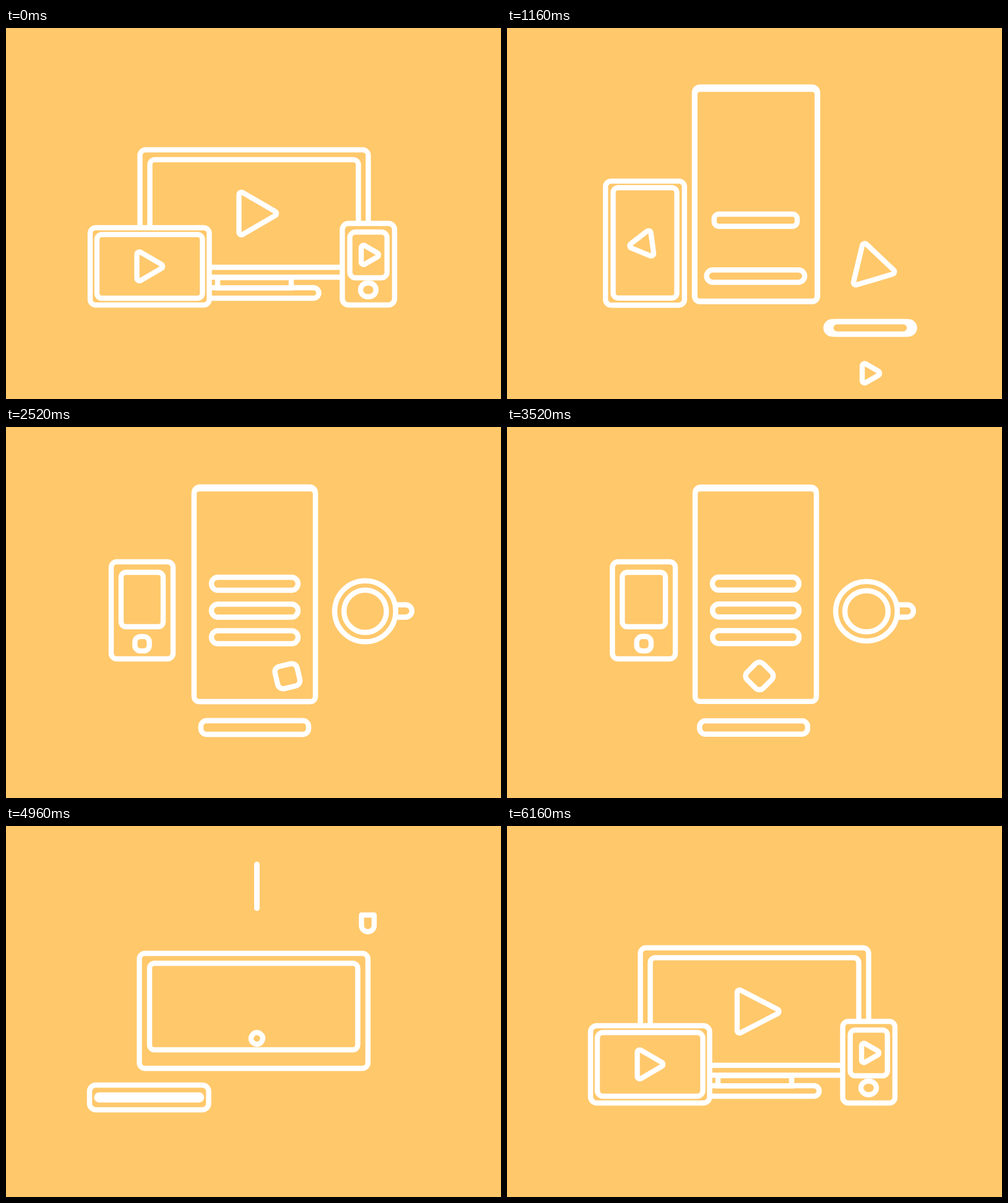
An HTML page with a canvas for the animation above (6200 ms loop, 800 px wide and 600 px high).

```html
<!DOCTYPE html>
<html lang="en">
<head>
<meta charset="utf-8">
<title>Devices</title>
<style>
html, body { margin: 0; width: 100%; height: 100%; overflow: hidden; background: #ffc86b; }
canvas { display: block; width: 800px; height: 600px; }
</style>
</head>
<body>
<canvas id="stage" width="800" height="600"></canvas>
<script>
const ctx = document.getElementById('stage').getContext('2d');
const LOOP = 6200, BG = '#ffc86b', RAD = Math.PI / 180;

const easeIn = power => u => u ** power;
const easeOut = u => 1 - (1 - u) ** 2;
const smooth = u => u * u * (3 - 2 * u);
const backOut = u => 1 + 2.7 * (u - 1) ** 3 + 1.7 * (u - 1) ** 2;
const part = (t, from, to) => Math.min(1, Math.max(0, (t - from) / (to - from)));

// Shared choreography: every part eases from one of its poses to the next.
const BEATS = {
  home: { from: 0, to: 480, ease: smooth },
  dive: { from: 480, to: 720, ease: easeIn(3) },
  hop: { from: 720, to: 1280, ease: easeOut },
  rise: { from: 720, to: 1640, ease: easeOut },
  desk: { from: 1640, to: 2520, ease: smooth },
  rest: { from: 2520, to: 3040, ease: easeOut },
  leave: { from: 3400, to: 4160, ease: easeIn(2) },
  turn: { from: 4160, to: 4480, ease: easeOut },
  drop: { from: 4160, to: 4960, ease: easeOut },
  land: { from: 4960, to: 5560, ease: smooth }
};

function pose(t, poses) {
  let now = null, end = 0;
  for (const name in poses) {
    const { from, to, ease } = BEATS[name], next = poses[name];
    if (now) {
      const p = ease(part(t, Math.max(from, end), to));
      now = now.map((v, i) => v + (next[i] - v) * p);
    } else {
      now = next;
    }
    end = to;
  }
  return now;
}

// Framed shapes: centre x, y, width, height, then inner inset at the sides, top, bottom.
const TV = [401, 300, 369, 206, 16, 16, 16];
const TABLET = [232.25, 385.5, 192.5, 125, 11, 11, 11];
const PHONE = [585.75, 382, 84.5, 132, 12.2, 14, 44];
const nudge = ([x, ...rest]) => [x - 1, ...rest];

const sheet = {
  home: TV,
  dive: [402, 279.5, 242, 307, 16, 16, 17],
  hop: [402.5, 268.5, 197, 349, 0, 3, 0],
  desk: [402, 270.5, 196, 347, 0, 3, 0],
  leave: [403, 271, 192, 338, 0, 0, 0],
  turn: [406, 245, 150, 288, 0, 0, 0],
  drop: [405.5, 97.5, 0, 71, 0, 0, 0],
  land: [405, 300, 0, 60, 0, 0, 0]
};
const left = {
  home: TABLET,
  dive: [231.75, 385.25, 200.5, 125.5, 14.5, 11, 11.5],
  rise: [219.75, 334, 100.5, 228.5, 11.5, 10.5, 11.5],
  desk: [220, 296.5, 100, 157, 16, 17, 52],
  leave: [266, 296.75, 168, 156.5, 15, 16.5, 52],
  drop: [400.25, 299, 369.5, 186, 16.5, 16, 30],
  land: nudge(TV)
};
const bar = {
  home: PHONE,
  dive: [585.75, 485, 84.5, 20, 12.5, 0, 0],
  rise: [587.5, 485, 165, 20, 0, 0, 0],
  desk: [402, 486, 174, 22, 0, 0, 0],
  leave: [268.5, 486, 191, 0, 0, 0, 0],
  turn: [231.5, 486, 193, 0, 11, 0, 0],
  drop: [231.25, 439, 192.5, 40, 11.5, 16, 16],
  land: nudge(TABLET)
};

// Pills: centre x, y, width, height, radius.
const STAND = [401.5, 412, 119, 16.5, 0];
const BASE = [401.25, 428.5, 208.5, 17, 8.5];
const at = (y, [x, , ...rest]) => [x, y, ...rest];
const textLine = (x, y) => [x, y, 140, 21, 10.5];
const lines = [
  { home: BASE, dive: at(501.5, BASE), rise: textLine(402, 364), desk: textLine(402, 297),
    leave: textLine(404, 286), turn: textLine(262, 286) },
  { home: STAND, dive: at(465, STAND), rise: textLine(402, 253.5),
    leave: textLine(397, 245.5), turn: textLine(262, 245.5) },
  { hop: textLine(402, 520), rise: textLine(402, 446), desk: textLine(402, 340),
    leave: textLine(407, 329.5), turn: textLine(262, 329.5) }
];
const button = {
  home: [585.5, 423.5, 25, 22, 12],
  dive: [585.5, 485, 25, 20, 10],
  rise: [587.5, 485, 165, 20, 10]
};

// Play signs: x, y, size, rotation, morph to square, stretch.
const bigPlay = {
  home: [398, 300, 43, 0, 0, 1],
  dive: [505, 303, 43, 100, 0, 1],
  hop: [592, 390, 43, 135, 0, 1],
  rise: [647, 395, 43, 152, 0, 1],
  desk: [455, 403, 26, 32, 1, 1],
  rest: [408, 403, 26, 0, 1, 1],
  leave: [405, 389, 26, -8, 1, 1],
  drop: [405.5, 343.5, 13, -100, 1, 1],
  land: [396, 300, 43, -120, 0, 1.12]
};
const leftPlay = {
  home: [226.7, 385.5, 30.3, 0, 0, 1],
  dive: [225, 386, 20.5, -8, 0, 1],
  rise: [220, 336, 29.5, -90, 0, 1],
  desk: [220, 350.5, 16.5, -135, 1, 1],
  leave: [269, 350, 16.5, -135, 1, 1],
  drop: [405.5, 343.5, 13, -190, 1, 1]
};
const smallPlay = {
  home: [584.7, 367, 21.3],
  dive: [584.7, 525, 21.3],
  hop: [584.7, 560, 21.3],
  rise: [580, 298, 0]
};

// x, y, radii, gap to the inner ring
const cup = {
  hop: [584.7, 560, 0, 0, 14.5],
  rise: [580, 298, 51.4, 51.4, 14.5],
  desk: [580.5, 298, 49.3, 49.3, 15],
  leave: [599.5, 298, 67, 1.5, 7],
  turn: [703, 298, 0, 0, 7]
};
// x, y, length, breadth, turn, flat-end radius, round-end radius
const handle = {
  hop: [584.7, 560, 0, 0, 0, 0, 10],
  rise: [637.5, 297.5, 27, 20, 0, 0, 10],
  desk: [642.5, 297.5, 27, 20, 0, 0, 10],
  leave: [679.5, 297.5, 27, 20.5, 0, 0, 10],
  drop: [584.75, 157.5, 27, 20.5, 90, 0, 10],
  land: [584.75, 382, 132, 84.5, 90, 9, 9]
};

function paint(join = 'round') {
  ctx.lineJoin = join;
  ctx.fill();
  ctx.stroke();
}

function box(x, y, w, h, r) {
  w = Math.max(0.1, w);
  h = Math.max(0.1, h);
  ctx.beginPath();
  ctx.roundRect(x - w / 2, y - h / 2, w, h, Math.min(r, w / 2, h / 2));
  paint(r < 1 ? 'miter' : 'round');
}

function inset([x, y, w, h, side, top, bottom], r) {
  box(x, y + (top - bottom) / 2, w - 2 * side, h - top - bottom, r);
}

function framed(p, r) {
  box(p[0], p[1], p[2], p[3], r);
  inset(p, r - 1);
}

function oval(x, y, rx, ry) {
  if (rx < 0.5) return;
  ctx.beginPath();
  ctx.ellipse(x, y, rx, Math.max(0.1, ry), 0, 0, 7);
  paint();
}

// A triangle whose fourth corner lies mid-edge until it swells into a square.
function play(x, y, size, rot = 0, morph = 0, sx = 1) {
  if (size < 3) return;
  const pts = [0, 1, 2, 3].map(i => {
    const mid = i === 2 ? 1 : 0;
    const [a, d] = [i * 120 - mid * 60 - (i === 3 ? 120 : 0), 1 - mid / 2];
    const px = d * Math.cos(a * RAD), py = d * Math.sin(a * RAD);
    const vx = (px + (Math.cos(i * 90 * RAD) - px) * morph) * size;
    const vy = (py + (Math.sin(i * 90 * RAD) - py) * morph) * size;
    const c = Math.cos(rot * RAD), s = Math.sin(rot * RAD);
    return [x + (vx * c - vy * s) * sx, y + vx * s + vy * c];
  });
  const r = Math.min(4 + 5 * morph, size * (0.2 + 0.45 * morph));
  ctx.beginPath();
  ctx.moveTo((pts[3][0] + pts[0][0]) / 2, (pts[3][1] + pts[0][1]) / 2);
  pts.forEach((p, i) => ctx.arcTo(...p, ...pts[(i + 1) % 4], r));
  ctx.closePath();
  paint();
}

function drawLines(t) {
  lines.slice(0, 2).forEach(line => box(...pose(t, line)));
  if (t < BEATS.hop.to) return;
  ctx.save();
  ctx.beginPath();
  ctx.rect(300, 90, 260, 353);
  ctx.clip();
  box(...pose(t, lines[2]));
  ctx.restore();
}

// The handle swings out and up on an arc before it falls into place.
function drawHandle(t) {
  const [x, y, w, h, rot, flat, round] = pose(t, handle);
  const swing = Math.sin(Math.PI * easeOut(part(t, BEATS.drop.from, BEATS.drop.to)));
  ctx.save();
  ctx.translate(x + 72 * swing, y);
  ctx.rotate(rot * RAD);
  ctx.beginPath();
  ctx.roundRect(-w / 2, -h / 2, w, h, [flat, round, round, flat]);
  paint(flat < 1 ? 'miter' : 'round');
  ctx.restore();
  return y;
}

function drawCup(t) {
  const [x, y, rx, ry, gap] = pose(t, cup);
  oval(x, y, rx, ry);
  oval(x, y, rx - gap, ry - gap);
}

function newPhone(t) {
  const y = drawHandle(t), grow = smooth(part(t, 5200, 5560));
  if (!grow) return;
  const [, , , , side, top, bottom] = PHONE;
  const w = PHONE[2] - 2 * side, h = PHONE[3] - top - bottom;
  box(584.75, y + (top - bottom) / 2, w * grow, h * grow, 8);
  const pop = backOut(part(t, 5400, 5900));
  oval(584.5, y + 41.5, 12.5 * pop, 11 * pop);
  play(583.7, y - 15, 21.3 * pop);
}

function draw(t) {
  ctx.fillStyle = BG;
  ctx.fillRect(0, 0, 800, 600);
  ctx.strokeStyle = '#fff';
  ctx.lineWidth = 8.4;

  if (t < 800) drawLines(t);
  if (t < BEATS.land.to) framed(pose(t, sheet), 9);
  if (t >= 800 && t < BEATS.turn.to) drawLines(t);
  if (t > 5250) {
    const lift = 75 * (1 - smooth(part(t, 5250, 5600)));
    [BASE, STAND].forEach(p => box(...nudge(at(p[1] - lift, p))));
  }

  framed(pose(t, left), 9);
  if (t < BEATS.drop.to) play(...pose(t, leftPlay));

  framed(pose(t, bar), 10);
  if (t < BEATS.rise.to) box(...pose(t, button));
  if (t > 5250) play(225.7, 385.5, 30.3 * backOut(part(t, 5250, 5900)));

  play(...pose(t, smallPlay));
  if (t > BEATS.hop.to && t < BEATS.drop.to) drawHandle(t);
  if (t < BEATS.turn.to) drawCup(t);
  if (t >= BEATS.drop.to) newPhone(t);

  play(...pose(t, bigPlay));
}

const start = performance.now();
function tick() {
  draw((performance.now() - start) % LOOP);
  requestAnimationFrame(tick);
}
tick();
</script>
</body>
</html>
```
